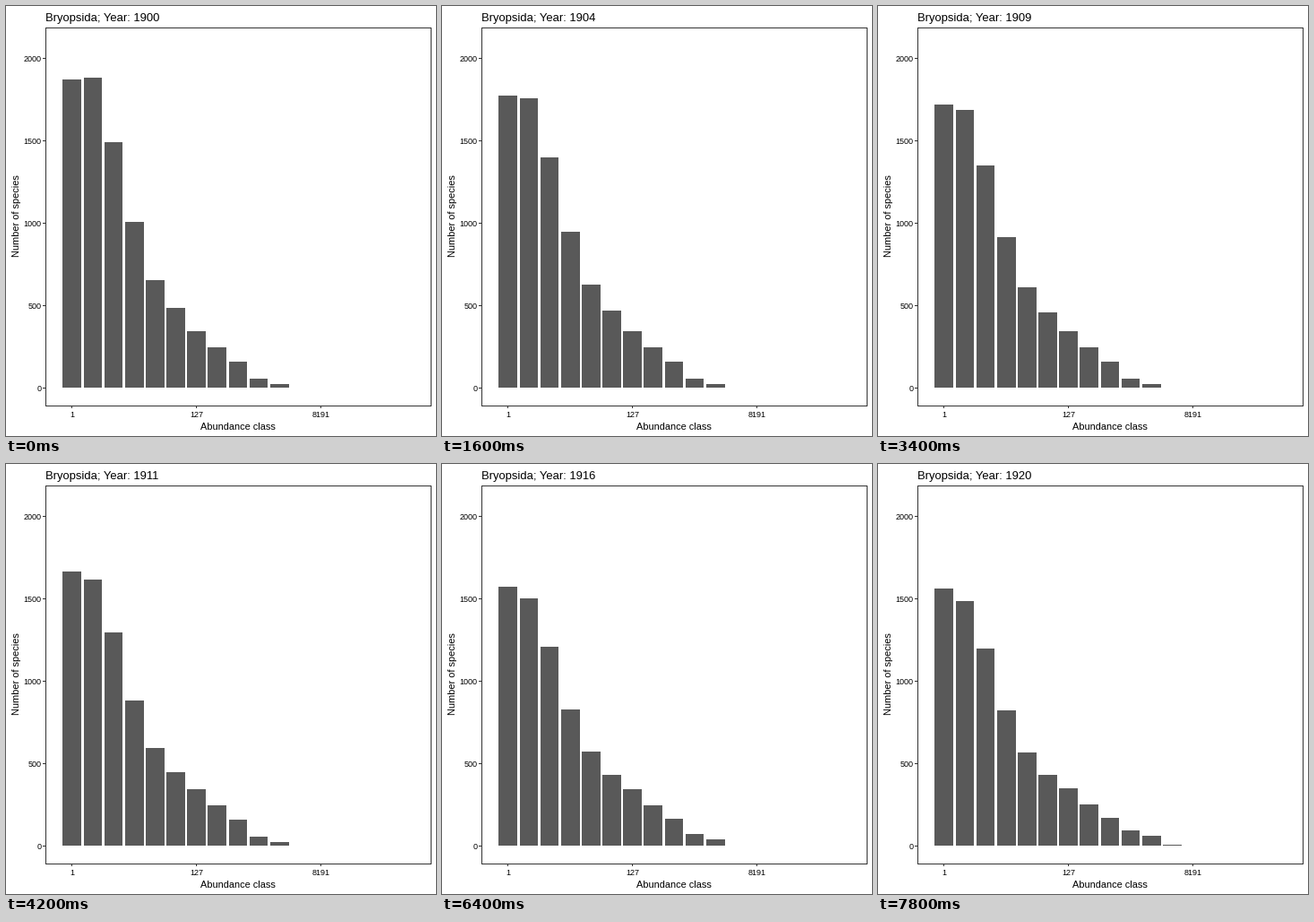
Recreate the animation shown at these times as a matplotlib script. Size 480x480 px, loop 8 s.

```python
import numpy as np
import matplotlib.pyplot as plt
from matplotlib.animation import FuncAnimation
from matplotlib.patches import Rectangle

SIZE, DPI = 480, 72          # at 72 dpi one point is one pixel
FRAMES, INTERVAL = 40, 200
FIRST_YEAR, YEARS = 1900, 20

BAR, LINE = "#595959", "#333333"
BASE, SCALE = 426, 0.184     # pixel row of zero, pixels per species
LEFT, STEP, WIDTH = 63.4, 23.14, 20.78

# Species per abundance class in the first and last year
START = [1870, 1880, 1490, 1005, 652, 484, 342, 245, 158, 54, 22, 0]
END = [1560, 1484, 1196, 820, 565, 429, 348, 250, 168, 92, 60, 5]

plt.rcParams["font.family"] = "Liberation Sans"
fig = plt.figure(figsize=(SIZE / DPI, SIZE / DPI), dpi=DPI, facecolor="white")
ax = fig.add_axes([0, 0, 1, 1])
ax.set_xlim(0, SIZE)
ax.set_ylim(SIZE, 0)
ax.axis("off")


def block(x, y, w, h, color=LINE):
    return ax.add_patch(Rectangle((x, y), w, h, facecolor=color,
                                  linewidth=0, antialiased=False))


def label(x, y, text, size, ha="center", va="baseline", **kw):
    return ax.text(x, y, text, fontsize=size, color="black", ha=ha, va=va, **kw)


def snap(v):
    return int(np.floor(v + 0.5))


def falling(u):
    """Uneven decline: quick, a pause, quick again, then level."""
    return np.interp(u, [0, 0.2, 0.36, 0.69, 1], [0, 0.32, 0.36, 0.93, 1])


def rising(u):
    """Growth that comes late."""
    return u ** 5


bars = []
for i in range(len(START)):
    x = LEFT + i * STEP
    bars.append(block(snap(x), BASE, snap(x + WIDTH) - snap(x), 0, BAR))

# Panel border
for y in (24, 446):
    block(44, y, 431, 1)
for x in (44, 474):
    block(x, 24, 1, 423)

# Axes
for k in range(5):
    y = BASE - 500 * k * SCALE
    block(41, y, 3, 1)
    label(39.5, y + 4, str(500 * k), 9, ha="right")
for i in (0, 6, 12):
    x = int(LEFT + i * STEP + WIDTH / 2)
    block(x, 447, 1, 2)
    label(x + 0.5, 459, str(2 ** (i + 1) - 1), 9)
label(258.5, 473, "Abundance class", 11)
label(12, 234.5, "Number of species", 11, va="center", rotation=90)
title = label(44, 17, "", 13, ha="left")


def draw(n):
    u = n / (FRAMES - 1)
    title.set_text(f"Bryopsida; Year: {FIRST_YEAR + snap(u * YEARS)}")
    for bar, a, b in zip(bars, START, END):
        ease = falling if b < a else rising
        height = snap((a + (b - a) * ease(u)) * SCALE)
        bar.set_y(BASE - height)
        bar.set_height(height)
    return bars + [title]


anim = FuncAnimation(fig, draw, frames=FRAMES, interval=INTERVAL,
                     repeat=True, repeat_delay=0, blit=False)
plt.show()
```
